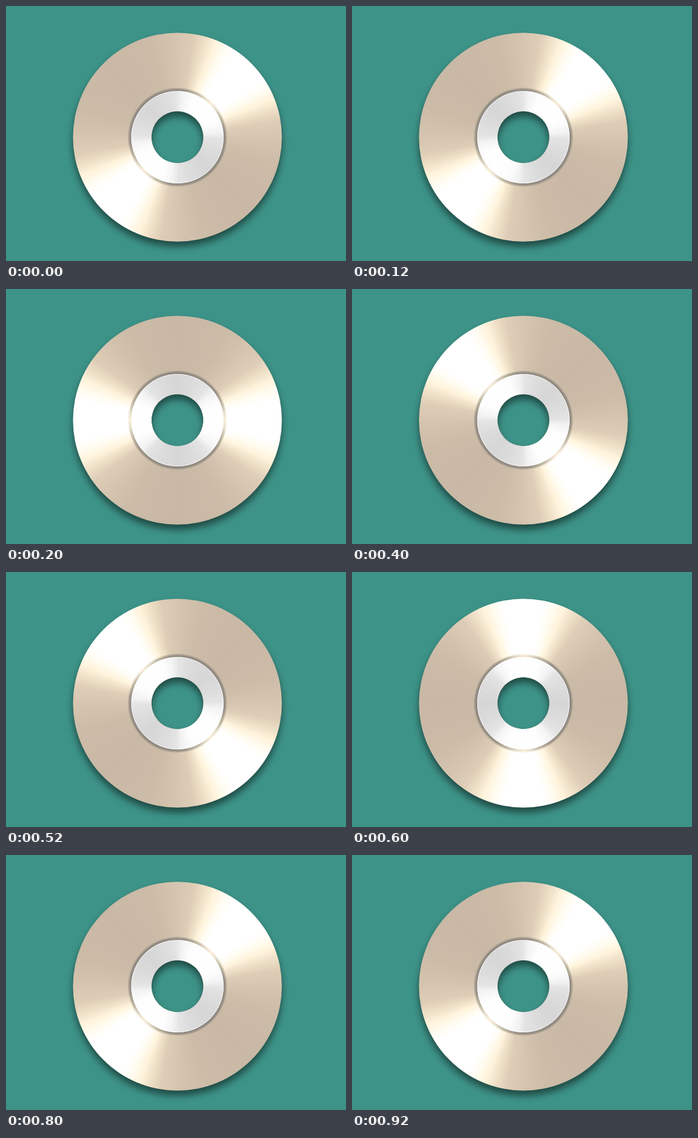
Write an HTML page with a canvas that moves like this. It is 600 px wide and 450 px high and loops after 1 s.

```html
<!DOCTYPE html>
<html lang="en">
<head>
<meta charset="utf-8">
<title>Spinning disc</title>
<style>
  html, body { margin: 0; width: 100%; height: 100%; overflow: hidden; background: #3d9388; }
  canvas { display: block; }
</style>
</head>
<body>
<canvas id="stage" width="600" height="450"></canvas>
<script>
const ctx = document.getElementById('stage').getContext('2d');
const CX = 302.5, CY = 231.5;
const DISC = 184.3, RING = 81.6, HOLE = 45.8;
const STEP_MS = 200, LOOP_MS = 1000;

// Each sheen lists [degrees from the highlight, colour] over a quarter turn.
const DISC_SHEEN = [
  [0, '#ffffff'], [11, '#ffffff'], [17, '#fffcf2'], [23, '#fff4dc'],
  [29, '#efe0c8'], [36, '#decdb6'], [46, '#d5c4af'], [62, '#cbbba7'], [90, '#c8b8a5']
];
const RIM_SHEEN = [
  [0, '#f6e9cb'], [8, '#e2d7bf'], [20, '#aea590'], [36, '#88827a'], [90, '#7f7b75']
];
const RING_SHEEN = [
  [0, '#ffffff'], [24, '#fdfdfd'], [38, '#f3f3f3'], [47, '#e4e4e4'], [65, '#dcdcdc'], [90, '#d6d6d6']
];

function sheen(stops, angle) {
  const g = ctx.createConicGradient(angle, CX, CY);
  for (const [deg, color] of stops) {
    for (const d of [deg, 180 - deg, 180 + deg, 360 - deg]) g.addColorStop(d / 360, color);
  }
  return g;
}

function annulus(outer, fill) {
  ctx.beginPath();
  ctx.arc(CX, CY, outer, 0, Math.PI * 2);
  ctx.moveTo(CX + HOLE, CY);
  ctx.arc(CX, CY, HOLE, 0, Math.PI * 2, true);
  ctx.fillStyle = fill;
  ctx.fill();
}

function circle(r, width, color) {
  ctx.beginPath();
  ctx.arc(CX, CY, r, 0, Math.PI * 2);
  ctx.lineWidth = width;
  ctx.strokeStyle = color;
  ctx.stroke();
}

function draw(angle) {
  ctx.fillStyle = '#3d9388';
  ctx.fillRect(0, 0, 600, 450);

  ctx.save();
  ctx.shadowColor = 'rgba(0, 0, 0, 0.5)';
  ctx.shadowBlur = 13;
  ctx.shadowOffsetY = 9;
  annulus(DISC, sheen(DISC_SHEEN, angle));
  ctx.restore();

  // Stacked translucent layers make the soft groove around the ring.
  const rim = sheen(RIM_SHEEN, angle);
  ctx.globalAlpha = 0.17;
  for (let r = 87.5; r > RING; r -= 0.5) annulus(r, rim);
  ctx.globalAlpha = 1;

  annulus(RING, sheen(RING_SHEEN, angle));
  circle(RING - 0.6, 1, 'rgba(255, 255, 255, 0.8)');
}

function tick(now) {
  const step = Math.floor((now % LOOP_MS) / STEP_MS);
  draw((step - 1) * Math.PI / 4);
  requestAnimationFrame(tick);
}

draw(-Math.PI / 4);
requestAnimationFrame(start => {
  const run = now => {
    tickAt(now - start);
    requestAnimationFrame(run);
  };
  run(start);
});

function tickAt(elapsed) {
  const step = Math.floor((elapsed % LOOP_MS) / STEP_MS);
  draw((step - 1) * Math.PI / 4);
}
</script>
</body>
</html>
```
